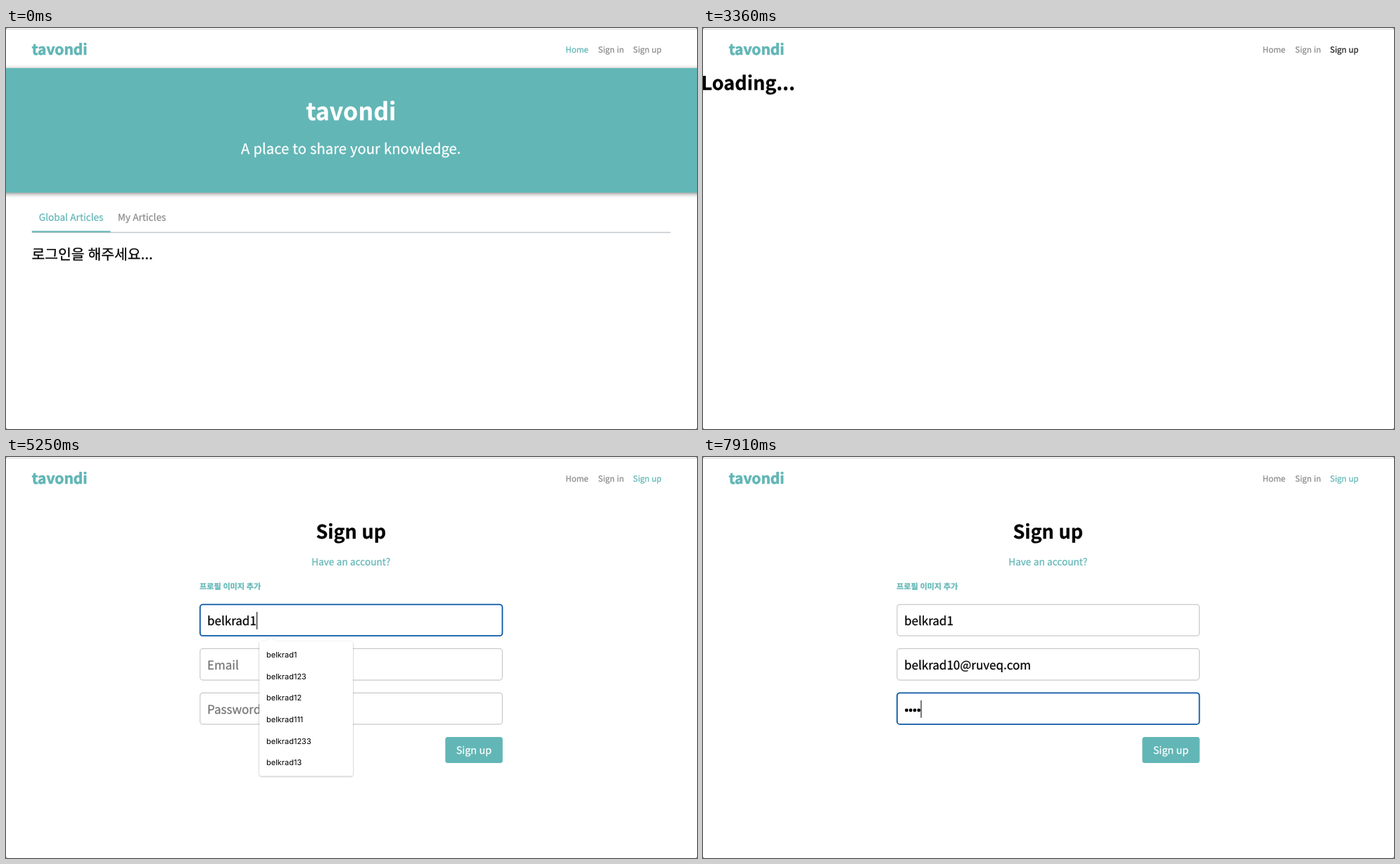
Animation, 982 px wide and 570 px high, one loop 8000 ms. Source, as an HTML page:

```html
<!DOCTYPE html>
<html lang="ko">
<head>
<meta charset="utf-8">
<title>Sign up flow</title>
<style>
  html, body { margin: 0; width: 100%; height: 100%; overflow: hidden; background: #fff; }
  svg { display: block; width: 982px; height: 570px; }
  text {
    font-family: "Noto Sans CJK KR", "Noto Sans CJK", "Noto Sans", sans-serif;
    text-rendering: geometricPrecision; white-space: pre;
    word-spacing: -.03em; stroke-width: .25px;
  }
  text[font-weight="900"] { stroke-width: .7px; }
  .list text { font-family: Inter, "Noto Sans CJK KR", sans-serif; font-size: 11px; }
</style>
</head>
<body>
<svg id="stage" viewBox="0 0 982 570" xmlns="http://www.w3.org/2000/svg">
  <defs>
    <filter id="heroShadow" filterUnits="userSpaceOnUse" x="-30" y="30" width="1042" height="240">
      <feDropShadow dx="0" dy="1.5" stdDeviation="3.4" flood-color="#000" flood-opacity=".48"/>
    </filter>
    <filter id="listShadow" filterUnits="userSpaceOnUse" x="340" y="240" width="330" height="300">
      <feDropShadow dx="0" dy=".8" stdDeviation=".9" flood-color="#000" flood-opacity=".36"/>
    </filter>
  </defs>
  <rect width="982" height="570" fill="#fff"/>
  <g id="page"></g>
  <rect y="1" width="982" height="1.2" fill="#dadada"/>
  <path d="M0 0h2q-2 0-2 2zM982 0h-2q2 0 2 2zM0 567.5q0 2.5 2.5 2.5H0zM982 567.5q0 2.5-2.5 2.5h2.5z" fill="#555"/>
</svg>
<script>
const LOOP = 8000;
const TEAL = '#62b6b6', GRAY = '#8c8c8c', DARK = '#222', HINT = '#757575';
const BRAND = 'tavondi';
const USER = 'belkrad', MAIL = USER + '10@ruveq.com', ALT_MAIL = 'tuvohanek@qovmi.com';

const FIELD_X = 286, FIELD_TOP = 209.6, FIELD_STEP = 62.85;
const DOT_STEP = 5.8;

const userTails = (...tails) => tails.map(s => USER + s);
const LISTS = {
  users: [USER, ALT_MAIL, USER + '1', USER + '2', '오나물', USER + '123'],
  matches: userTails('', '1', '2', '123', '12', '111'),
  narrowed: userTails('1', '123', '12', '111', '1233', '13'),
  mails: [MAIL, ALT_MAIL, ...userTails('@ruveq.com', '1@ruveq.com', '2@ruveq.com', '12@ruveq.com')],
  mailMatches: ['', 'dddddd', '1', '12'.repeat(6) + '123'.repeat(3), '12312313', 'dadadad'].map(s => MAIL + s)
};
const LIST_WIDTH = { users: 153.5, matches: 133, narrowed: 133, mails: 153.5, mailMatches: 276 };

// Returns the value of the last [time, value] step already reached.
const at = (t, steps) => steps.reduce((value, [start, next]) => t >= start ? next : value, null);

const rect = (x, y, w, h, fill, extra = '') =>
  `<rect x="${x}" y="${y}" width="${w}" height="${h}" fill="${fill}" ${extra}/>`;
const label = (s, x, y, size, color, weight = 400, anchor = 'start') =>
  `<text x="${x}" y="${y}" font-size="${size}" fill="${color}" stroke="${color}" font-weight="${weight}" text-anchor="${anchor}">${s}</text>`;
const centered = (s, y, size, color, weight) => label(s, 490.3, y, size, color, weight, 'middle');

function header(state) {
  return label(BRAND, 36.8, 38.4, 20.9, TEAL, 900) +
    label('Home', 795.3, 34.8, 11.5, state.home) +
    label('Sign in', 841.6, 34.8, 11.5, GRAY) +
    label('Sign up', 891.1, 34.8, 11.5, state.signUp);
}

function homePage(state) {
  const [barX, barW] = state.tab === 'global' ? [36.8, 111.7] : [148.5, 88.9];
  return rect(-25, 57, 1032, 177, TEAL, 'filter="url(#heroShadow)"') +
    centered(BRAND, 131, 34, '#fff', 700) +
    centered('A place to share your knowledge.', 179.3, 20.25, '#fff') +
    label('Global Articles', 46.8, 273.6, 13.6, state.globalTab) +
    label('My Articles', 158.7, 273.6, 13.6, state.myTab) +
    rect(36.8, 289.8, 907.6, 1.6, '#c6cacd') +
    rect(barX, 288.4, barW, 2.1, TEAL) +
    label('로그인을 해주세요...', 36.4, 328.8, 20.4, '#000');
}

function field(index, hint, value, focused) {
  const y = FIELD_TOP + index * FIELD_STEP;
  const stroke = focused ? 'stroke="#0b57a4" stroke-width="1.8"' : 'stroke="#c9c9c9" stroke-width="1.2"';
  return rect(275.8, y, 429.6, 44.6, '#fff', `rx="4" ${stroke}`) +
    (value === null ? '' : label(value || hint, FIELD_X, y + 29.3, 17, value ? '#000' : HINT));
}

function dots(count) {
  let out = '';
  for (let i = 0; i < count; i++) {
    out += `<circle cx="${FIELD_X + 0.4 + DOT_STEP * (i + 0.5)}" cy="360" r="2.4"/>`;
  }
  return out;
}

const ruler = document.createElement('canvas').getContext('2d');
function textWidth(s) {
  ruler.font = '17px "Noto Sans CJK KR", "Noto Sans CJK", "Noto Sans", sans-serif';
  return ruler.measureText(s).width;
}

function caret(index, offset) {
  return rect(FIELD_X + offset + 0.2, FIELD_TOP + index * FIELD_STEP + 10.6, 1.2, 24.8, '#222');
}

function dropdown(name, index) {
  const top = 262 + index * FIELD_STEP, w = LIST_WIDTH[name];
  const shape = `M363 ${top}H369.5L377 ${top - 5.5}L384.5 ${top}H${357 + w}q3 0 3 3v185.3q0 3-3 3H363q-3 0-3-3V${top + 3}q0-3 3-3z`;
  return `<g class="list"><path d="${shape}" fill="#fff" filter="url(#listShadow)"/>` +
    LISTS[name].map((s, i) => `<text x="370" y="${top + 22.9 + i * 30.65}">${s}</text>`).join('') + '</g>';
}

function formPage(state) {
  const { focus, user, mail, count } = state;
  const offset = focus === 2 ? count * DOT_STEP : textWidth(focus === 1 ? mail : user);
  return centered('Sign up', 115.6, 27, '#000', 700) +
    centered('Have an account?', 153.5, 13.6, TEAL) +
    label('프로필 이미지 추가', 275, 188.3, 11.1, TEAL, 700) +
    field(0, 'Username', user, focus === 0) +
    field(1, 'Email', mail, focus === 1) +
    field(2, 'Password', count ? null : '', focus === 2) +
    dots(count) +
    rect(624.3, 398, 81.5, 37, TEAL, 'rx="3.5"') +
    label('Sign up', 665, 422.4, 14.3, '#fff', 400, 'middle') +
    (focus >= 0 && state.caretOn ? caret(focus, offset) : '') +
    (state.list ? dropdown(state.list, focus) : '');
}

function stateAt(t) {
  return {
    page: at(t, [[0, 'home'], [3360, 'loading'], [3430, 'form']]),
    home: at(t, [[0, TEAL], [3360, GRAY]]),
    signUp: at(t, [[0, GRAY], [3080, DARK], [3430, TEAL]]),
    tab: at(t, [[0, 'global'], [1050, 'my'], [1820, 'global']]),
    globalTab: at(t, [[0, TEAL], [1050, GRAY], [1400, DARK], [2030, TEAL]]),
    myTab: at(t, [[0, GRAY], [700, DARK], [1400, TEAL], [1820, GRAY]]),
    focus: at(t, [[0, -1], [4060, 0], [5670, 1], [6860, 2]]),
    user: at(t, [[0, ''], [4900, USER], [5180, USER + '1']]),
    mail: at(t, [[0, ''], [6370, MAIL]]),
    count: at(t, [[0, 0], [7210, 1], [7420, 2], [7630, 3], [7910, 4]]),
    caretOn: at(t, [[0, true], [4550, false], [4900, true], [6230, false], [6370, true]]),
    list: at(t, [[0, ''], [4060, 'users'], [4970, 'matches'], [5250, 'narrowed'], [5670, ''],
      [5740, 'mails'], [6440, 'mailMatches'], [6860, '']])
  };
}

const PAGES = {
  home: homePage,
  loading: () => label('Loading...', -2.4, 88.4, 27, '#000', 700),
  form: formPage
};

const page = document.getElementById('page');
let shown = '';
function render(t) {
  const state = stateAt(t);
  const key = JSON.stringify(state);
  if (key === shown) return;
  shown = key;
  page.innerHTML = PAGES[state.page](state) + header(state);
}

const start = performance.now();
function tick() {
  render((performance.now() - start) % LOOP);
  requestAnimationFrame(tick);
}
tick();
</script>
</body>
</html>
```
